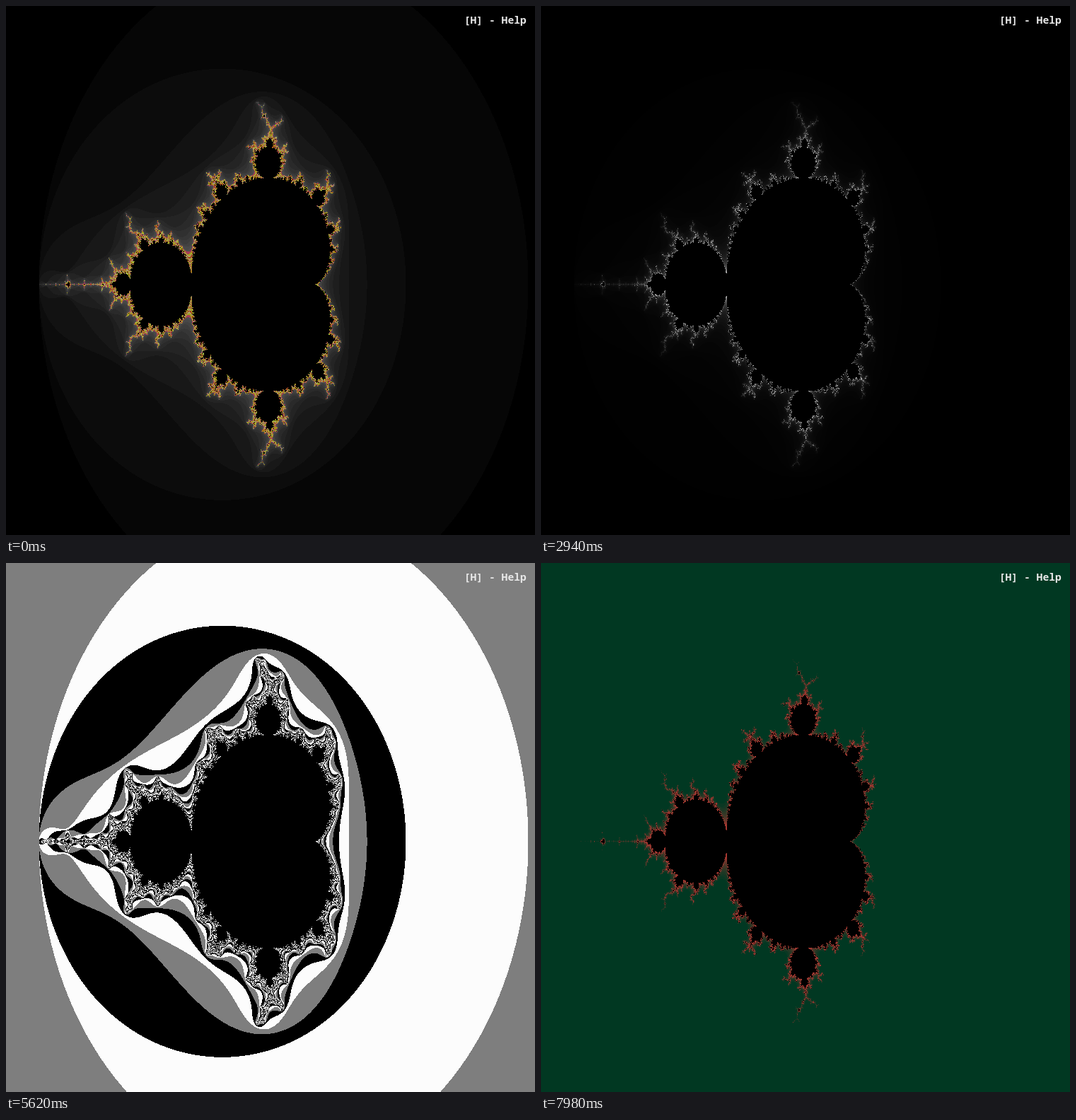
Recreate the animation shown at these times as an HTML page with a canvas. Size 748 by 748 pixels, loop 8 s.

```html
<!DOCTYPE html>
<html lang="en">
<head>
<meta charset="utf-8">
<title>Fractal palettes</title>
<style>
  html, body { margin: 0; width: 100%; height: 100%; overflow: hidden; background: #000; }
  canvas { position: absolute; left: 0; top: 0; width: 748px; height: 748px; }
  #hint {
    position: absolute; left: 647.7px; top: 10px;
    font: 600 14.7px/18px "Noto Sans Mono", "DejaVu Sans Mono", monospace;
    color: #e8e8e8; white-space: pre;
  }
</style>
</head>
<body>
<canvas id="view" width="748" height="748"></canvas>
<div id="hint">[H] - Help</div>
<script>
const SIZE = 748, LOOP = 8000, LIMIT = 45;
const FIRST = 420, HOLD = 2520; // time of the first palette change, then the gap between changes
const ORIGIN = { x: 392, y: 393.25 }, SCALE = { x: 173, y: 230.6 };
const ctx = document.getElementById('view').getContext('2d');

// Step at which the orbit of c leaves radius 2; 0 when it stays.
function escapeStep(re, im) {
  let x = re, y = im;
  for (let n = 1; n < LIMIT; n++) {
    const xx = x * x, yy = y * y;
    if (xx + yy > 4) return n;
    y = 2 * x * y + im;
    x = xx - yy + re;
  }
  return 0;
}

const steps = Uint8Array.from({ length: SIZE * SIZE }, (_, i) => escapeStep(
  (i % SIZE - ORIGIN.x) / SCALE.x,
  (Math.floor(i / SIZE) - ORIGIN.y) / SCALE.y
));

const gray = v => [v, v, v];
const mix = (a, b, f) => a.map((v, c) => v + (b[c] - v) * f);
const clamp = f => Math.min(1, Math.max(0, f));

// Each palette turns an escape step into a colour.
const palettes = [
  n => n < 15 ? gray(6 * (n - 1)) : [165, 125 + 65 * Math.sin(2 * n), 60 + 50 * Math.cos(3 * n)],
  n => mix([31, 0, 33], [235, 140, 20], (n / LIMIT) ** 1.2),
  n => gray(255 * (n / 50) ** 2),
  n => gray(n % 3 * 126),
  n => mix([1, 56, 34], [165, 55, 48], clamp((n - 12) / 18))
];

function paint(color) {
  const img = ctx.createImageData(SIZE, SIZE);
  const table = Array.from({ length: LIMIT }, (_, n) => [...(n ? color(n) : gray(0)), 255]);
  steps.forEach((n, i) => img.data.set(table[n], i * 4));
  return img;
}
const images = palettes.map(paint);

let shown = -1;
function render(t) {
  const i = Math.max(0, Math.floor((t - FIRST) / HOLD) + 1);
  if (i === shown) return;
  ctx.putImageData(images[i], 0, 0);
  shown = i;
}

const start = performance.now();
function tick() {
  render((performance.now() - start) % LOOP);
  requestAnimationFrame(tick);
}
tick();
</script>
</body>
</html>
```
